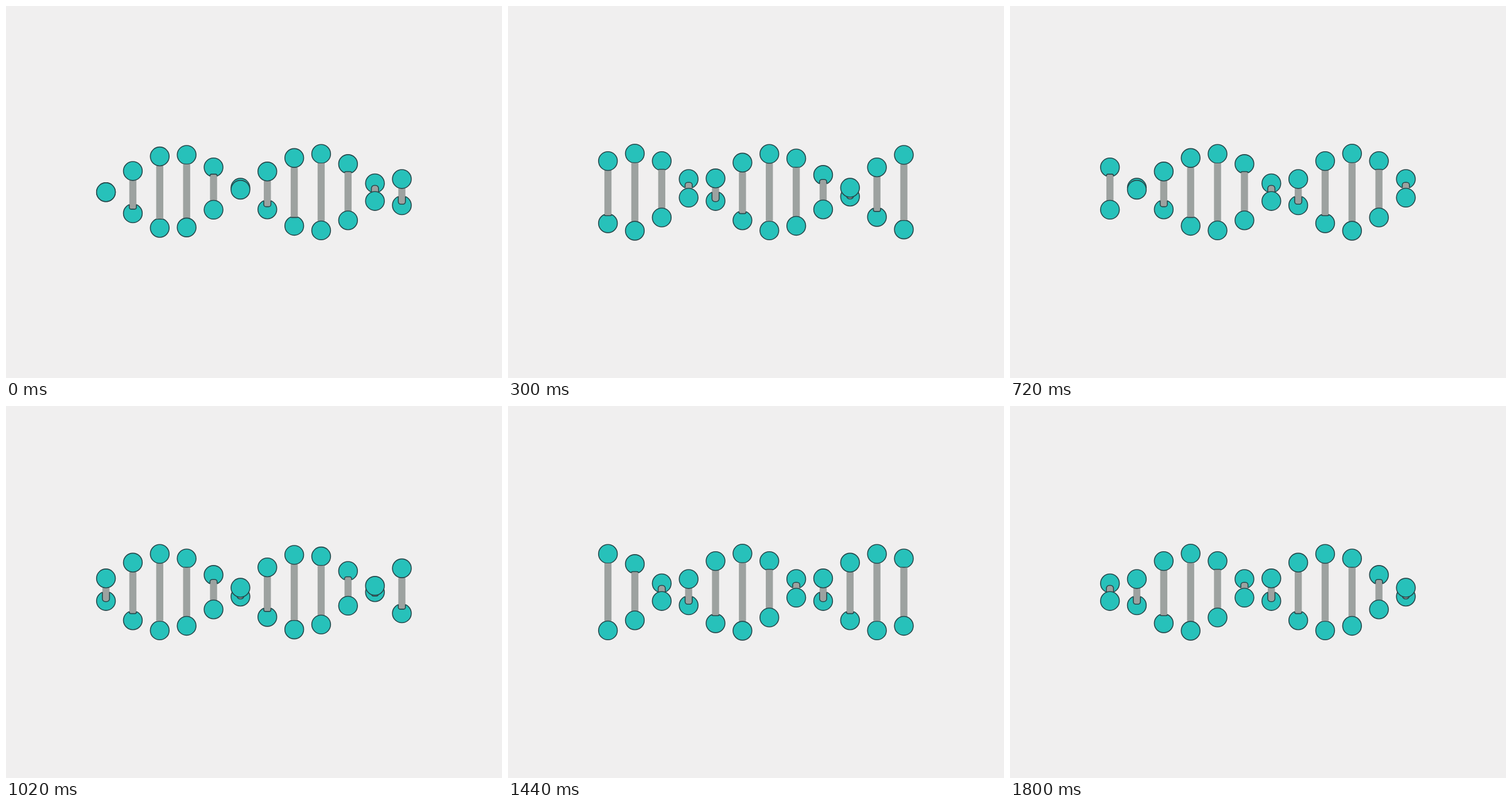
Animation, 864 px wide and 648 px high, one loop 1860 ms. Source, as an HTML page with a canvas:

```html
<!DOCTYPE html>
<html lang="en">
<head>
<meta charset="utf-8">
<title>Turning helix</title>
<style>
  html, body { margin: 0; width: 100%; height: 100%; overflow: hidden; background: #f0efef; }
  canvas { display: block; }
</style>
</head>
<body>
<canvas width="864" height="648"></canvas>
<script>
const ctx = document.querySelector('canvas').getContext('2d');
const LOOP = 1860, TURN = 52, COLUMNS = 12, LAG = 5;
const MID = 324.3, SWING = 67.2, RADIUS = 16.4, BAR = 12.4;
const TEAL = '#27c1ba', GREY = '#9da2a0', INK = '#26474a';

// Cubic ease with flat ends; x1 and x2 are the handle positions.
function ease(x, x1, x2) {
  let lo = 0, hi = 1, s;
  for (let i = 0; i < 24; i++) {
    s = (lo + hi) / 2;
    const at = 3 * x1 * s * (1 - s) ** 2 + 3 * x2 * s * s * (1 - s) + s ** 3;
    if (at < x) lo = s; else hi = s;
  }
  return s * s * (3 - 2 * s);
}

function pose(n) {
  const half = TURN / 2, quarter = TURN / 4;
  const x = Math.min(n % half, half - n % half) / quarter;
  const spread = 1.5 * x - 0.5 * x ** 3;
  const bFront = n >= quarter && n < 3 * quarter;
  const a = n < half ? -spread : spread;
  const b = bFront ? 1 - 2 * ease((n - quarter) / half, 1 / 6, 2 / 3) : -a;
  return { a: MID + SWING * a, b: MID + SWING * b, spread, bFront };
}

function ballPath(x, y) {
  ctx.beginPath();
  ctx.arc(x, y, RADIUS, 0, 2 * Math.PI);
}

function ball(x, y) {
  ballPath(x, y);
  ctx.fillStyle = TEAL;
  ctx.fill();
  ctx.stroke();
}

function bar(x, backY, spread) {
  const mid = MID + 3 * (1 - spread);
  const reach = 4 + 44 * spread + 3 * spread ** 6;
  const path = () => {
    ctx.beginPath();
    ctx.roundRect(x - BAR / 2, mid - reach, BAR, 2 * reach, Math.min(reach, 6.2 - 5 * spread));
  };
  path();
  ctx.fillStyle = GREY;
  ctx.fill();
  // The outline shows only where the bar lies over the rear ball.
  ctx.save();
  ballPath(x, backY);
  ctx.clip();
  path();
  ctx.stroke();
  ctx.restore();
}

function draw(step) {
  ctx.fillStyle = '#f0efef';
  ctx.fillRect(0, 0, 864, 648);
  ctx.strokeStyle = INK;
  ctx.lineWidth = 1.6;
  for (let i = 0; i < COLUMNS; i++) {
    const x = 174.1 + 46.86 * i;
    const { a, b, spread, bFront } = pose((step + LAG * i) % TURN);
    const [back, front] = bFront ? [a, b] : [b, a];
    ball(x, back);
    bar(x, back, spread);
    ball(x, front);
  }
}

// Five steps every 180 ms; the first of them is held twice as long.
function stepAt(t) {
  return 5 * Math.floor(t / 180) + Math.max(0, Math.floor(t % 180 / 30) - 1);
}

const start = performance.now();
function tick() {
  draw(stepAt((performance.now() - start) % LOOP));
  requestAnimationFrame(tick);
}
tick();
</script>
</body>
</html>
```
